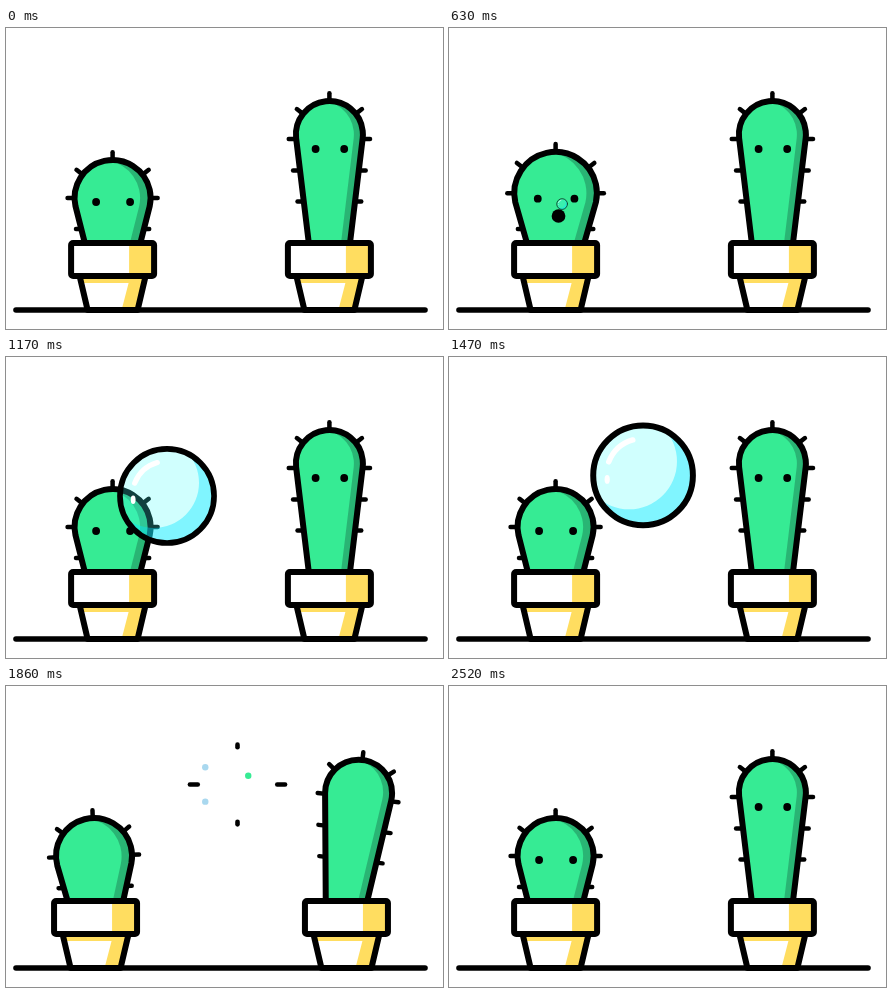
Recreate the animation shown at these times as an HTML page with a canvas. Size 437 by 301 pixels, loop 2.55 s.

```html
<!DOCTYPE html>
<html lang="en">
<head>
<meta charset="utf-8">
<title>Cactus bubble</title>
<style>
html, body { margin: 0; width: 100%; height: 100%; overflow: hidden; background: #fff; }
canvas { display: block; width: 437px; height: 301px; }
</style>
</head>
<body>
<canvas id="stage"></canvas>
<script>
const W = 437, H = 301, LOOP = 2550;
const BLOW = 600, POP = 1765, REST = 2280;
const GREEN = '#36eb94', SHADE = '#29b574', YELLOW = '#ffdd60', BLUE = '#a9d8ef';
const canvas = document.getElementById('stage');
const ctx = canvas.getContext('2d');
const dpr = window.devicePixelRatio || 1;
canvas.width = W * dpr;
canvas.height = H * dpr;

const span = (t, a, b) => Math.max(0, Math.min(1, (t - a) / (b - a)));
const ease = (t, a, b) => {
  const u = span(t, a, b);
  return u * u * (3 - 2 * u);
};
// Out, back past the middle and to rest; a larger damping overshoots less
const swing = (u, damping) => Math.sin(5.07 * u) * Math.pow(1 - u, damping);

function stroke(width, color = '#000') {
  ctx.lineWidth = width;
  ctx.strokeStyle = color;
  ctx.stroke();
}

function line(x1, y1, x2, y2, width) {
  ctx.beginPath();
  ctx.moveTo(x1, y1);
  ctx.lineTo(x2, y2);
  stroke(width);
}

function oval(x, y, rx, ry, color) {
  ctx.beginPath();
  ctx.ellipse(x, y, rx, ry, 0, 0, 7);
  ctx.fillStyle = color;
  ctx.fill();
}

function drawPot() {
  const cup = new Path2D('M-33 35 L-25 69 H25 L33 35 Z');
  ctx.fillStyle = '#fff';
  ctx.fill(cup);
  ctx.fillStyle = YELLOW;
  ctx.fill(new Path2D('M-32 35 H32 L25 69 H9 L16 42 H-31 Z'));
  ctx.lineWidth = 6;
  ctx.strokeStyle = '#000';
  ctx.stroke(cup);
  ctx.fillStyle = '#fff';
  ctx.fillRect(-41.5, 2, 83, 33);
  ctx.fillStyle = YELLOW;
  ctx.fillRect(16.5, 2, 25, 33);
  ctx.beginPath();
  ctx.roundRect(-41.5, 2, 83, 33, 2);
  stroke(6);
}

function drawSpikes({ base, r, cy, lean, walls }) {
  for (const deg of [38, 90, 142]) {
    const a = deg * Math.PI / 180, x = Math.cos(a), y = -Math.sin(a);
    line(x * r, cy + y * r, x * (r + 7.8), cy + y * (r + 7.8), 4.5);
  }
  for (const y of walls) {
    const half = base + (r * Math.cos(lean) - base) * (y - 7) / (cy - 7);
    const tip = half + 4 + 4 * Math.sqrt(y / cy);
    for (const side of [-1, 1]) line(side * half, y, side * tip, y, 4.4);
  }
}

function drawBody({ base, r, cy, lean, band }) {
  const body = new Path2D();
  body.moveTo(-base, 7);
  body.arc(0, cy, r, Math.PI - lean, Math.PI * 2 + lean);
  body.lineTo(base, 7);
  body.closePath();
  ctx.save();
  ctx.clip(body);
  ctx.fillStyle = SHADE;
  ctx.fill(body);
  ctx.translate(-band, 0);
  ctx.fillStyle = GREEN;
  ctx.fill(body);
  ctx.restore();
  ctx.lineWidth = 6;
  ctx.strokeStyle = '#000';
  ctx.stroke(body);
}

function drawCactus(x, tilt, open, cactus) {
  const { eyeX, eyeY, mouth = 0, mouthX } = cactus;
  ctx.save();
  ctx.translate(x, 213);
  ctx.save();
  ctx.rotate(tilt * Math.PI / 180);
  drawSpikes(cactus);
  drawBody(cactus);
  for (const side of [-1, 1]) oval(.5 + side * eyeX, eyeY, 3.9, 3.9 * open, '#000');
  oval(mouthX, -25, mouth, mouth, '#000');
  ctx.restore();
  drawPot();
  ctx.restore();
}

function shortCactus(t) {
  const puff = ease(t, 150, 390) - 1.3 * ease(t, 570, 780) + .3 * ease(t, 870, 1110);
  const cy = -43 - 6.5 * puff;
  return {
    base: 26.5 + puff, r: 38 + 4.5 * puff, cy, lean: .22, band: 10.5,
    walls: [cy, -12],
    eyeX: 17 + 1.8 * puff, eyeY: -39 - 4.5 * puff,
    mouth: 7 * ease(t, 180, 360) - 3.6 * ease(t, BLOW, 870) - 3.4 * ease(t, 870, 990),
    mouthX: 1.5 + 2.8 * ease(t, 390, 870)
  };
}

const tallCactus = {
  base: 20, r: 33.5, cy: -106.5, lean: .11, band: 9,
  walls: [-102, -70.5, -39.5],
  eyeX: 14.3, eyeY: -92, mouthX: 0
};

function drawBubble(t) {
  if (t <= BLOW || t >= POP) return;
  const u = span(t, BLOW, POP), size = 1 - Math.pow(1 - u, 4.2);
  ctx.save();
  ctx.translate(110.8 + 85.5 * u + 34.6 * u * u, 178.2 - 80 * u);
  ctx.scale(size, size);
  oval(0, 0, 50, 50, 'rgba(67,255,251,.25)');
  ctx.save();
  ctx.clip();
  ctx.beginPath();
  ctx.rect(-60, -60, 120, 120);
  ctx.arc(-14, -14, 48, 0, 7);
  ctx.fillStyle = 'rgba(0,230,255,.39)';
  ctx.fill('evenodd');
  ctx.restore();
  ctx.beginPath();
  ctx.arc(0, 0, 37, Math.PI * 1.12, Math.PI * 1.41);
  stroke(5.5, '#fff');
  oval(-36, 4, 2.6, 4.5, '#fff');
  ctx.beginPath();
  ctx.arc(0, 0, 50, 0, 7);
  stroke(6);
  ctx.restore();
}

function drop(x, y, fall, color, u) {
  const out = 1 - Math.pow(1 - u, 4);
  oval(x * out, y * out + fall * u * u, 3.2, 3.2, color);
}

function drawBurst(t) {
  if (t < POP) return;
  ctx.save();
  ctx.translate(231.5, 98.5);
  const v = span(t, POP, POP + 245);
  ctx.globalAlpha = Math.min(1, (1 - v) * 3);
  const dy = 8 + 78 * v, dx = 8 + 91 * v;
  for (const side of [-1, 1]) {
    line(0, side * (dy - 1.3), 0, side * (dy + 1.3), 4.6);
    line(side * (dx - 4), 0, side * (dx + 4), 0, 4.4);
  }
  const u = span(t, POP, POP + 395);
  ctx.globalAlpha = Math.max(0, Math.min(1, (.96 - u) / .6));
  drop(-48, -25, -9, BLUE, u);
  drop(-48, 23, 29, BLUE, u);
  drop(16, -13, 0, GREEN, u);
  ctx.restore();
}

function draw(t) {
  ctx.setTransform(dpr, 0, 0, dpr, 0, 0);
  ctx.fillStyle = '#fff';
  ctx.fillRect(0, 0, W, H);
  ctx.lineCap = ctx.lineJoin = 'round';
  const u = span(t, POP - 10, REST);
  const shove = 28.3 * swing(u, 1.55);
  const open = 1 - ease(t, POP, 1800) + ease(t, 1950, 2010);
  drawCactus(106.6 - shove, -Math.sin(2 * Math.PI * u) * (1.6 + 2.4 * u), open, shortCactus(t));
  drawCactus(323.4 + shove, 9.4 * swing(u, .9), open, tallCactus);
  line(10, 282, 419, 282, 5.6);
  drawBubble(t);
  drawBurst(t);
}

const start = performance.now();
function tick(now) {
  draw(Math.max(0, now - start) % LOOP);
  requestAnimationFrame(tick);
}
draw(0);
requestAnimationFrame(tick);
</script>
</body>
</html>
```
